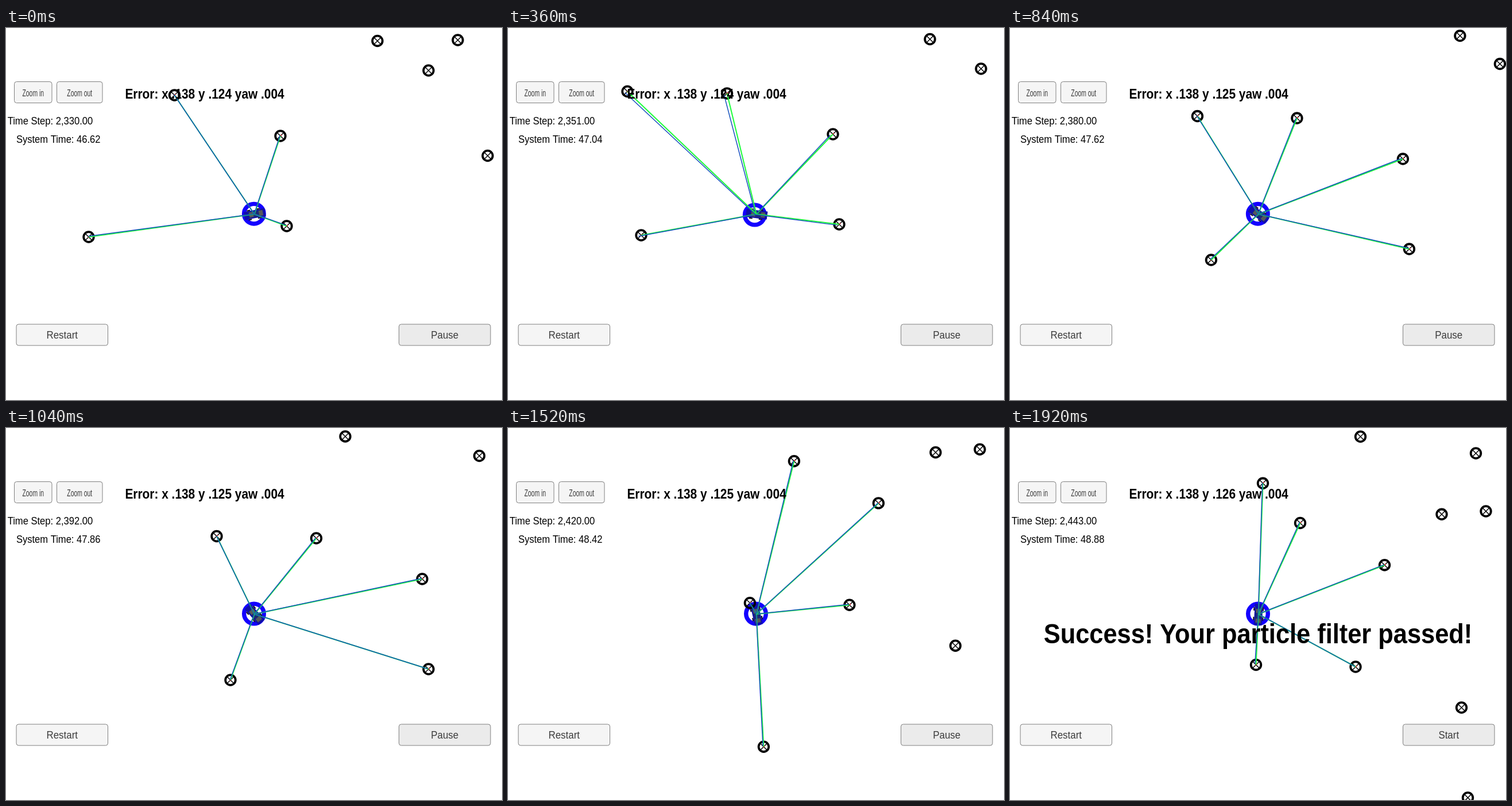
An HTML page with a canvas that plays this animation: 864x648 px, repeating every 4.66 s.

```html
<!DOCTYPE html>
<html lang="en">
<head>
<meta charset="utf-8">
<title>Particle filter</title>
<style>
html, body { margin: 0; width: 100%; height: 100%; overflow: hidden; background: #fff; }
canvas { display: block; }
</style>
</head>
<body>
<canvas id="stage" width="864" height="648"></canvas>
<script>
const ctx = document.getElementById('stage').getContext('2d');
const SANS = '"Liberation Sans", Arial, sans-serif';
const LOOP = 4660, TICK = 40, LAST = 48;
const RANGE = 320;
const ASPECT = 0.9; // the whole interface is drawn slightly narrow
const CAR = { x: 432.7, y: 324.3 };

// Landmark places at the first time step
const marks = [
  [144, 364], [293.5, 117], [478, 188], [489, 345], [647, 22.5], [736, 74],
  [787, 21], [839, 222.5], [120, 113.5], [344, -60.3], [577.5, -26.5],
  [197, -133.5], [132, -202.7], [443.5, -148.7], [520.5, -154],
  [302, -284], [503, -255]
];

// Key points of the drive: tick, time step, map shift
const path = [
  [0, 2330, 0, 0], [9, 2351, 88, -3], [16, 2368, 159.5, 15], [26, 2392, 247, 75],
  [33, 2408, 286, 136.5], [42, 2429, 307, 234], [48, 2443, 308.5, 299]
].map(([tick, step, x, y]) => ({ tick, step, x, y }));

const mix = (a, b, u) => a + (b - a) * u;
const bump = (t, mid, width) => Math.exp(-(((t - mid) / width) ** 2));

function noise(a, b) {
  const n = Math.sin(a * 12.9898 + b * 78.233) * 43758.5453;
  return (n - Math.floor(n)) * 2 - 1;
}

// Slope of one coordinate per time step at key point i
function slope(i, axis) {
  const rise = j => (path[j + 1][axis] - path[j][axis]) / (path[j + 1].step - path[j].step);
  const end = path.length - 1;
  if (i === 0) return 2 * rise(0) - slope(1, axis);
  if (i === end) return 2 * rise(end - 1) - slope(end - 1, axis);
  const before = path[i].step - path[i - 1].step, after = path[i + 1].step - path[i].step;
  return mix(rise(i - 1), rise(i), before / (before + after));
}

function poseAt(tick) {
  let i = 0;
  while (i < path.length - 2 && path[i + 1].tick <= tick) i++;
  const a = path[i], b = path[i + 1];
  const step = Math.round(mix(a.step, b.step, (tick - a.tick) / (b.tick - a.tick)));
  const span = b.step - a.step, u = (step - a.step) / span, v = 1 - u;
  const place = axis => a[axis] * v * v * (1 + 2 * u) + b[axis] * u * u * (3 - 2 * u)
    + span * u * v * (slope(i, axis) * v - slope(i + 1, axis) * u);
  const speed = axis => mix(slope(i, axis), slope(i + 1, axis), u);
  const swing = bump(tick, 11, 6);
  return {
    step,
    x: place('x'),
    y: place('y'),
    heading: Math.atan2(speed('y'), speed('x')),
    errX: -0.7 - 2.5 * swing,
    errY: -0.7 + 2.2 * swing
  };
}

function line(x1, y1, x2, y2, color, width) {
  ctx.strokeStyle = color;
  ctx.lineWidth = width;
  ctx.beginPath();
  ctx.moveTo(x1, y1);
  ctx.lineTo(x2, y2);
  ctx.stroke();
}

function ring(x, y, r, color, width) {
  ctx.strokeStyle = color;
  ctx.lineWidth = width;
  ctx.beginPath();
  ctx.arc(x, y, r, 0, Math.PI * 2);
  ctx.stroke();
}

function text(str, x, y, size, { color = '#000', weight = '', align = 'left', narrow = ASPECT } = {}) {
  ctx.save();
  ctx.translate(x, y);
  ctx.scale(narrow, 1);
  ctx.font = `${weight} ${size}px ${SANS}`;
  ctx.fillStyle = color;
  ctx.textAlign = align;
  ctx.fillText(str, 0, 0);
  ctx.restore();
}

function button(label, x, y, w, fill, size = 18.8, narrow = ASPECT) {
  ctx.beginPath();
  ctx.roundRect(x, y, w, 37, 4);
  ctx.fillStyle = fill;
  ctx.fill();
  ctx.strokeStyle = '#808080';
  ctx.lineWidth = 1;
  ctx.stroke();
  text(label, x + w / 2, y + 25.3, size, { color: '#3c3c3c', align: 'center', narrow });
}

function landmark(x, y, seen) {
  ring(x, y, 8.8, '#000', 3.8);
  line(x - 5.5, y - 5.5, x + 5.5, y + 5.5, '#000', 1.5);
  line(x - 5.5, y + 5.5, x + 5.5, y - 5.5, '#000', 1.5);
  if (seen) line(x - 1, y + 1, x + 2, y - 2, '#e22', 1.4);
}

function drawCar(heading) {
  const box = (x, y, w, h, color) => {
    ctx.fillStyle = color;
    ctx.fillRect(x, y, w, h);
  };
  ctx.save();
  ctx.translate(CAR.x, CAR.y);
  ctx.rotate(heading);
  box(-18, -7, 37, 14, '#1010a8');
  box(-10, -5, 24, 10, '#1c2878');
  for (const x of [-9, 8]) {
    box(x, -4.5, 7, 9, '#55585c');
    for (const y of [-9, 7]) box(x - 3, y, 6, 2, '#101020');
  }
  ctx.restore();
}

// Green: true readings. Blue: the same readings from the estimated place.
function drawBeams(points, { step, errX, errY }) {
  points.forEach(([x, y], n) => {
    const endX = x + errX * 1.6 + noise(step, n) * 0.8;
    const endY = y + errY * 1.6 + noise(step, n + 50) * 0.8;
    line(CAR.x, CAR.y, x, y, '#1eff3c', 2);
    line(CAR.x + errX * 0.5, CAR.y + errY * 0.5, endX, endY, '#1450be', 1.5);
  });
}

function drawPanel(tick, step) {
  const done = tick === LAST;
  const short = n => n.toFixed(3).slice(1);
  const errX = short(0.1382 - 0.0008 * bump(tick, 16, 5));
  const errY = short(0.124 + 0.0016 * tick / LAST);
  const count = step.toLocaleString('en-US', { minimumFractionDigits: 2 });
  button('Zoom in', 14.5, 93.5, 65.5, '#f5f5f5', 17, 0.61);
  button('Zoom out', 88.5, 93.5, 79.5, '#f5f5f5', 17, 0.61);
  button('Restart', 18, 516, 159.5, '#f5f5f5');
  button(done ? 'Start' : 'Pause', 684.5, 516, 159.5, '#ebebeb');
  text(`Time Step: ${count}`, 2.7, 168, 18.4);
  text(`System Time: ${((step + 1) / 50).toFixed(2)}`, 17.9, 200, 18.4);
  text(`Error: x ${errX} y ${errY} yaw .004`, 207.4, 122.8, 23.2, { weight: 'bold' });
  if (done) text('Success! Your particle filter passed!', 432, 374.5, 48.2, { weight: 'bold', align: 'center' });
}

function draw(ms) {
  const tick = Math.min(LAST, Math.floor(ms / TICK));
  const pose = poseAt(tick);
  const points = marks.map(([x, y]) => [x + pose.x, y + pose.y]);
  const near = ([x, y]) => Math.hypot(x - CAR.x, y - CAR.y) < RANGE;
  ctx.fillStyle = '#fff';
  ctx.fillRect(0, 0, 864, 648);
  ring(CAR.x + pose.errX, CAR.y + pose.errY, 17.3, '#1400ff', 7.4);
  drawCar(pose.heading);
  points.forEach(p => landmark(p[0], p[1], near(p)));
  drawBeams(points.filter(near), pose);
  drawPanel(tick, pose.step);
}

const start = performance.now();
function frame() {
  draw((performance.now() - start) % LOOP);
  requestAnimationFrame(frame);
}
frame();
</script>
</body>
</html>
```
